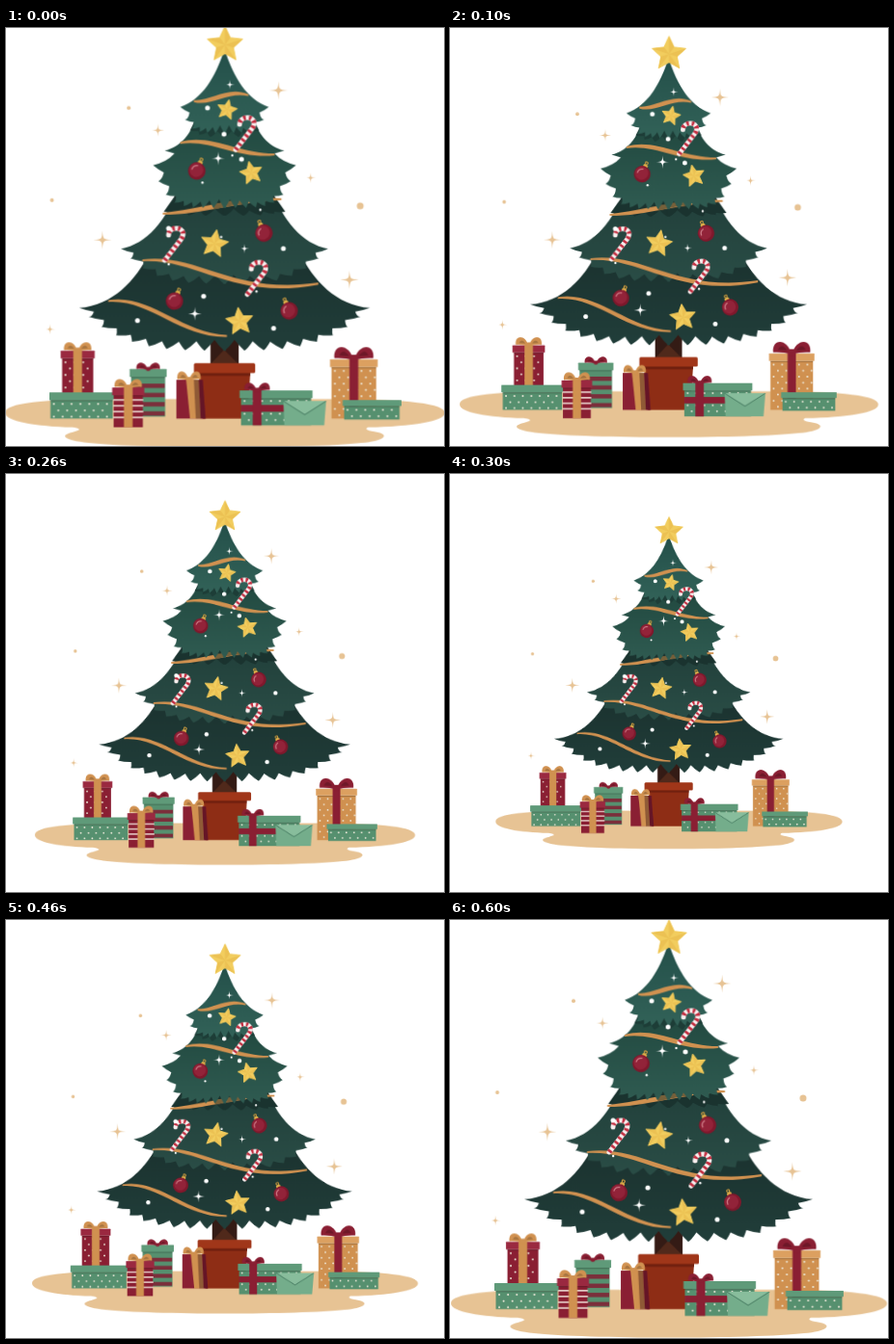
An HTML page for the animation above (0.7 s loop, 454x434 px).

```html
<!DOCTYPE html>
<html lang="en">
<head>
<meta charset="utf-8">
<title>Christmas tree</title>
<style>
html, body { margin: 0; width: 100%; height: 100%; overflow: hidden; background: #fff; }
svg { display: block; width: 454px; height: 434px; overflow: hidden; }
#scene { transform-origin: 227px 217px; }
</style>
</head>
<body>
<svg viewBox="0 0 454 434">
  <defs id="defs"></defs>
  <g id="scene"></g>
</svg>
<script>
const RED = '#8a1f33', TAN = '#d09150', SAND = '#e7c394', GREEN = '#56906f', GOLD = '#f2cd5e';
const LIDS = { [RED]: '#9a2940', [TAN]: '#dca060', [GREEN]: '#5f9a79' };
const MID = 226.5;
const scene = document.getElementById('scene');
const defs = document.getElementById('defs');
let out = '';

const path = (d, fill, extra = '') => out += `<path d="${d}" fill="${fill}" ${extra}/>`;
const line = (d, color, w, extra = '') => path(d, 'none', `stroke="${color}" stroke-width="${w}" ${extra}`);
const rect = (x, y, w, h, fill, r = 0) => out += `<rect x="${x}" y="${y}" width="${w}" height="${h}" rx="${r}" fill="${fill}"/>`;
const dot = (x, y, r, fill = '#fff') => out += `<circle cx="${x}" cy="${y}" r="${r}" fill="${fill}"/>`;

function gradient(id, top, bottom) {
  defs.innerHTML += `<linearGradient id="${id}" x1="0" y1="0" x2="0" y2="1">` +
    `<stop offset="0" stop-color="${top}"/><stop offset="1" stop-color="${bottom}"/></linearGradient>`;
  return `url(#${id})`;
}

// Half a layer from its side curve: n fronds hang along an eased arc
// from the outer tip (x, y) to the trunk, then the half is mirrored.
function tier({ side, x, y, top, drop, n, size, steep = 3.5, fill }) {
  const tip = i => {
    const u = (i / n) ** 1.25;
    return { u, x: x + (MID - x) * u, y: y + drop * (1 - (1 - u) ** steep) };
  };
  let d = `${side} ${x} ${y}`;
  for (let i = 1; i <= n; i++) {
    const a = tip(i - 1), b = tip(i);
    const nx = (a.x + b.x) / 2 + size * (1 - b.u), ny = (a.y + b.y) / 2 - size * b.u;
    d += `Q${(a.x + nx) / 2} ${(a.y + ny) / 2 + 1} ${nx} ${ny}`;
    d += `Q${(nx + b.x) / 2 + 1} ${(ny + b.y) / 2 + 3} ${b.x} ${b.y}`;
  }
  d += `H228V${top}Z`;
  path(d, fill);
  path(d, fill, `transform="translate(${2 * MID} 0) scale(-1 1)"`);
}

function sparkle(x, y, r, fill = '#fff') {
  const k = r * .07;
  const arm = (sx, sy, tx, ty) => `C${x + sx * k} ${y + sy * k} ${x + sx * k} ${y + sy * k} ${x + tx * r} ${y + ty * r}`;
  path(`M${x} ${y - r}${arm(1, -1, 1, 0)}${arm(1, 1, 0, 1)}${arm(-1, 1, -1, 0)}${arm(-1, -1, 0, -1)}Z`, fill);
}

function star(x, y, r, turn) {
  const pt = i => {
    const a = (turn - 90 + i * 36) * Math.PI / 180, q = i % 2 ? r * .48 : r;
    return `${(x + q * Math.cos(a)).toFixed(1)} ${(y + q * Math.sin(a)).toFixed(1)}`;
  };
  const pts = Array.from({ length: 10 }, (_, i) => pt(i));
  path(`M${pts.join('L')}Z`, GOLD, `stroke="${GOLD}" stroke-linejoin="round"`);
  for (let i = 0; i < 10; i += 2) path(`M${x} ${y}L${pts[i]}L${pts[i + 1]}Z`, '#e6b548', 'opacity=".5"');
}

function bauble(x, y, lean) {
  const r = 9;
  out += `<g transform="translate(${x} ${y}) rotate(${lean})">`;
  line(`M0 ${-r - 1}q-3 -4 0 -4q3 0 0 4`, '#c99a3f', 1.2);
  rect(-2.5, -r - 2, 5, 4, '#e0b04a', 1);
  dot(0, 0, r, '#7f182c');
  dot(-.8, -.8, r - 1.8, '#922339');
  line(`M${-r * .6} 0q0 ${-r * .5} ${r * .45} ${-r * .6}`, '#cf7b87', 1.3, 'stroke-linecap="round"');
  out += '</g>';
}

function cane(x, y) {
  const d = `M${x} ${y}l17 -22c4 -6 1 -11 -5 -11c-5 0 -8 3 -8 7`;
  line(d, '#f8eeee', 5, 'stroke-linecap="round"');
  line(d, '#c32e40', 5, 'stroke-dasharray="2.6 3"');
}

// A ribbon that swells in the middle and tapers to both ends
function garland(x, y, ax, ay, bx, by, tx, ty) {
  const w = 3;
  path(`M${x} ${y}C${ax} ${ay - w} ${bx} ${by - w} ${tx} ${ty - 1}v2` +
    `C${bx} ${by + w} ${ax} ${ay + w} ${x} ${y + 2}Z`, TAN);
}

function bow(x, y, w, h, color) {
  for (const s of [-1, 1]) {
    path(`M${x} ${y}C${x + s * w * .25} ${y - h * 1.3} ${x + s * w * 1.1} ${y - h * 1.2} ${x + s * w} ${y - h * .15}` +
      `Q${x + s * w * .5} ${y - h * .2} ${x} ${y}Z`, color);
    path(`M${x + s * w * .25} ${y - h * .3}Q${x + s * w * .55} ${y - h * .9} ${x + s * w * .75} ${y - h * .35}Z`, '#0003');
  }
  rect(x - w * .2, y - h * .4, w * .4, h * .5, color, 2);
}

function dots(x, y, w, h, step) {
  for (let j = 0; j * step < h; j++)
    for (let i = j % 2 / 2; i * step * 1.4 < w; i++)
      dot(x + i * step * 1.4, y + j * step, 1, '#eeeadb');
}

function stripes(x, y, w, count, gap, h, color) {
  for (let i = 0; i < count; i++) rect(x, y + i * gap, w, h, color);
}

// A box with a lid that juts out; the pattern goes under the ribbon
function box({ x, y, w, h, lid = 8, color, pattern, ribbon, at = w / 2, bowW }) {
  rect(x + 1.5, y + lid, w - 3, h - lid, color);
  if (pattern === 'dots') dots(x + 5, y + lid + 4, w - 8, h - lid - 5, 6.5);
  else if (pattern) pattern();
  rect(x, y, w, lid, LIDS[color], .5);
  rect(x + 1.5, y + lid, w - 3, 1.3, '#0003');
  if (!ribbon) return;
  rect(x + at - 4.5, y, 9, h, ribbon);
  bow(x + at, y + 1, bowW, bowW * .72, ribbon);
}

function ground() {
  path('M1 398C1 388 40 384 115 384H340C415 384 453 389 453 398C453 407 420 412 374 413Q368 416 384 418' +
    'C397 421 390 427 367 429C315 435 140 435 87 429C60 426 57 421 70 418Q84 415 70 413C32 412 1 407 1 398Z', SAND);
}

function tree() {
  rect(212, 314, 29, 36, '#341b15');
  path('M212 348L226 333L241 348Z', '#50291b');
  path('M200 356H253L250 404H204Z', '#8e2d15');
  rect(200, 356, 53, 4, '#70200f');
  rect(195, 347, 63, 10, '#a03619', 1.5);

  tier({ side: 'M150 232C135 262 112 287', x: 77, y: 290, top: 232, drop: 44, n: 9, size: 11,
    fill: gradient('low', '#1b322f', '#213e3a') });
  tier({ side: 'M178 168C167 199 147 224', x: 120, y: 229, top: 168, drop: 36, n: 7, size: 9,
    fill: gradient('wide', '#213f3a', '#2a4d46') });
  tier({ side: 'M180 168L', x: 164, y: 191, top: 168, drop: 4, n: 4, size: 7, fill: '#1a332f' });
  garland(163, 192, 205, 191, 235, 178, 285, 178);
  line('M215 186Q235 181 250 180', '#76603a', 5);
  tier({ side: 'M197 92C193 110 182 124 165 128L175 131Q167 140', x: 153, y: 143, top: 92, drop: 44, n: 8, size: 9,
    steep: 6, fill: gradient('mid', '#21483f', '#2f5b51') });
  tier({ side: 'M198 94L', x: 191, y: 107, top: 94, drop: 7, n: 3, size: 6, fill: '#1d3d37' });
  tier({ side: 'M226 25C217 52 204 75', x: 181, y: 83, top: 25, drop: 27, n: 6, size: 8,
    steep: 6, fill: gradient('peak', '#24504a', '#326258') });

  garland(195, 76, 213, 80, 230, 64, 251, 71);
  garland(181, 119, 212, 113, 240, 134, 278, 132);
  garland(142, 240, 200, 236, 235, 280, 323, 265);
  garland(107, 282, 150, 278, 180, 318, 229, 319);
}

function ornaments() {
  star(227, 19, 19, 0);
  star(229, 86, 10.5, 12);
  star(254, 151, 12, -12);
  star(216, 224, 14.5, 10);
  star(242, 304, 14.5, -6);
  bauble(198, 149, 22);
  bauble(267, 213, -22);
  bauble(175, 283, 22);
  bauble(293, 293, -22);
  for (const [x, y] of [[238, 127], [165, 241], [250, 276]]) cane(x, y);
  for (const [x, y, r] of [[232, 60, 5], [220, 136, 7], [247, 229, 5], [196, 296, 7]]) sparkle(x, y, r);
  for (const [x, y] of [[209, 84], [226, 111], [244, 137], [169, 208], [287, 229], [205, 278], [137, 303], [277, 311]]) dot(x, y, 2.5);
  // Fine snow, spread by the golden ratio and wider lower down
  for (let i = 1; i <= 6; i++) dot(MID + ((i * .618) % 1 - .5) * (50 + i * 18), 105 + i * 28, 1.2);
}

function sky() {
  for (const [x, y, r] of [[282, 66, 9.5], [158, 107, 6.5], [315, 156, 5.5], [101, 220, 9.5], [355, 261, 9.5], [47, 312, 5.5]])
    sparkle(x, y, r, SAND);
  dot(128, 84, 2, SAND);
  dot(49, 179, 2, SAND);
  dot(366, 185, 3.5, SAND);
}

function gifts() {
  box({ x: 58, y: 334, w: 35, h: 44, color: RED, pattern: 'dots', ribbon: TAN, bowW: 14 });
  box({ x: 46, y: 377, w: 67, h: 27, color: GREEN, pattern: 'dots' });
  box({ x: 129, y: 353, w: 38, h: 49, color: GREEN, pattern: () => stripes(131, 368, 34, 4, 9.5, 4.5, '#7b2f3b') });
  bow(148, 354, 12, 8, RED);
  box({ x: 111, y: 372, w: 33, h: 41, color: RED, pattern: () => stripes(112, 384, 31, 4, 6, 1.6, '#ecd9d2'),
    ribbon: TAN, bowW: 14 });

  // Narrow box in the shade of the pot
  path('M177 364H204L207 404H177Z', RED);
  path('M200 364H204L207 404H202Z', '#651526');
  path('M187 364H196L198 404H191Z', TAN);
  path('M195 364H200L202 404H197Z', '#8f5a36');
  bow(190, 365, 12, 10, TAN);

  box({ x: 335, y: 343, w: 49, h: 61, color: TAN, pattern: 'dots', ribbon: RED, bowW: 20 });
  box({ x: 348, y: 385, w: 60, h: 20, lid: 6, color: GREEN, pattern: 'dots' });
  box({ x: 242, y: 375, w: 75, h: 36, color: GREEN, ribbon: RED, at: 18, bowW: 13,
    pattern: () => { dots(247, 386, 66, 23, 6.5); rect(243.5, 390, 72, 7, RED); } });

  path('M287 386H331L329 411H288Z', '#74ad8b');
  path('M287 386H331L309 400Z', '#88bd9c');
  line('M287 386L309 400L331 386', '#4d8267', 1);
}

ground();
sky();
tree();
ornaments();
gifts();
scene.innerHTML = out;

const scales = [1.008, .96, .872, .795, .885, .98, 1];
const steps = [...scales, scales[0]].map((s, i) => ({
  transform: `scale(${s})`, offset: i / scales.length, easing: 'step-end'
}));
scene.animate(steps, { duration: 700, iterations: Infinity });
</script>
</body>
</html>
```
